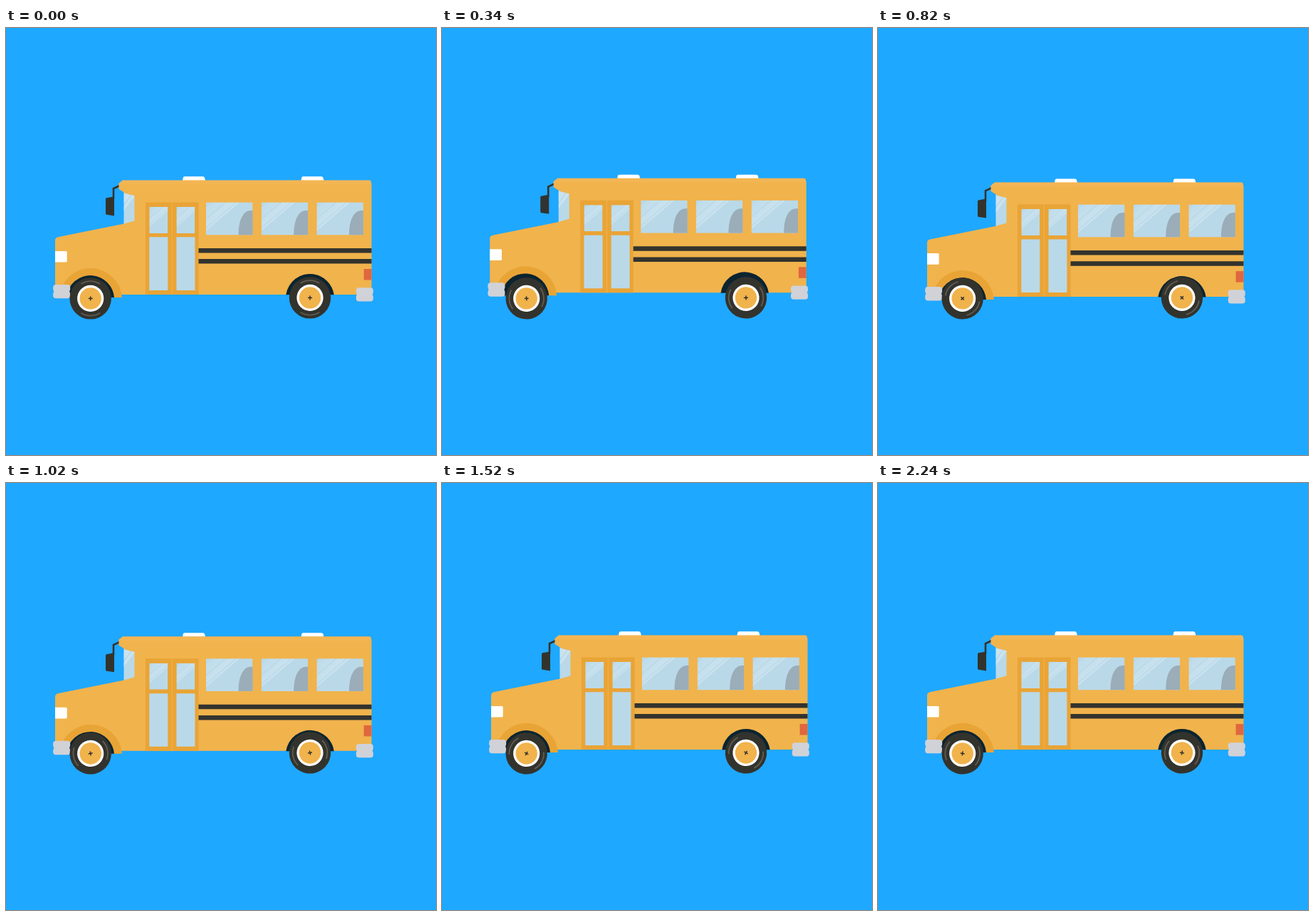
Animation of 604x599 px, one loop 2.26 s. Source, as an HTML page with a canvas:

```html
<!DOCTYPE html>
<html lang="en">
<head>
<meta charset="utf-8">
<title>School bus</title>
<style>
html, body { margin: 0; width: 100%; height: 100%; overflow: hidden; background: #1fa8ff; }
canvas { display: block; }
</style>
</head>
<body>
<canvas id="stage" width="604" height="599"></canvas>
<script>
const ctx = document.getElementById('stage').getContext('2d');
const LOOP = 2260, STEP = 20, SPIN = 1300, BOUNCE = 180;
const C = {
  sky: '#1fa8ff', body: '#f1b34c', roof: '#f4b553', trim: '#e9a436', glass: '#b9d9e9',
  seat: '#9aadb9', dark: '#33332e', arch: '#0b2430', chrome: '#d0d2d8', lamp: '#e0673f',
  tread: '#615c52', white: '#ffffff'
};

// Body offsets [x, y], one every BOUNCE ms.
const bounce = [[0, 0], [0, 8], [-2, -4], [0, 4], [0, 0], [0, 5.6], [0, 0]];

function bodyOffset(t) {
  const k = Math.floor(t / BOUNCE), f = t / BOUNCE - k;
  if (k >= bounce.length - 1) return [0, 0];
  return bounce[k].map((v, i) => v + (bounce[k + 1][i] - v) * f);
}

function box(color, x, y, w, h, r = 0) {
  ctx.fillStyle = color;
  ctx.beginPath();
  ctx.roundRect(x, y, w, h, r);
  ctx.fill();
}

function shape(color, d) {
  ctx.fillStyle = color;
  ctx.fill(new Path2D(d));
}

function disc(color, x, y, r) {
  ctx.fillStyle = color;
  ctx.beginPath();
  ctx.arc(x, y, r, 0, Math.PI * 2);
  ctx.fill();
}

// Circle cap above a horizontal line.
function dome(color, x, y, r, bottom) {
  const a = Math.asin((bottom - y) / r);
  ctx.fillStyle = color;
  ctx.beginPath();
  ctx.arc(x, y, r, Math.PI - a, Math.PI * 2 + a);
  ctx.fill();
}

function clipped(x, y, w, h, draw) {
  ctx.save();
  ctx.beginPath();
  ctx.rect(x, y, w, h);
  ctx.clip();
  ctx.translate(x, y);
  draw();
  ctx.restore();
}

// Diagonal reflections in the top left corner of a pane.
function shine(size) {
  const g = ctx.createLinearGradient(0, 0, size * 0.6, size * 0.6);
  g.addColorStop(0, 'rgba(255,255,255,.05)');
  g.addColorStop(1, 'rgba(255,255,255,.28)');
  for (const [from, to] of [[0.2, 0.62], [0.68, 0.98], [1.03, 1.12]]) {
    const a = from * size, b = to * size;
    shape(g, `M${a} 0H${b}L0 ${b * 0.85}V${a * 0.85}Z`);
  }
}

function sideWindow(x) {
  clipped(x, 244.5, 65.5, 46, () => {
    box(C.glass, 0, 0, 65.5, 46);
    shine(42);
    shape(C.seat, 'M45.5 46C45.5 27 51 11.5 63 11.5H66V46Z');
  });
}

function doorLeaf(x) {
  clipped(x, 251, 26, 37, () => {
    box(C.glass, 0, 0, 26, 37);
    shine(29);
  });
  box(C.glass, x, 293.3, 26, 74.7);
}

function bumper(x, y) {
  box(C.chrome, x, y, 24, 10, 4);
  box(C.chrome, x, y + 9.3, 24, 10, 4);
  box(C.chrome, x + 1, y + 6, 22, 7);
}

function drawBody() {
  for (const x of [248, 414.5]) {
    shape(C.white, `M${x} 214L${x + .7} 210Q${x + 1} 208.3 ${x + 3} 208.3H${x + 28.5}Q${x + 30.5} 208.3 ${x + 31} 210L${x + 32} 214Z`);
  }

  shape(C.glass, 'M165.5 228L182 234V272L165.5 276Z');
  shape('rgba(255,255,255,.28)', 'M165.5 232L175 234L165.5 247ZM177 234H180.5V236L165.5 256V250Z');

  ctx.strokeStyle = C.dark;
  ctx.lineWidth = 2.6;
  ctx.stroke(new Path2D('M151 240V225.2L159.5 221.3'));
  shape(C.dark, 'M140 240Q140 238.6 141.3 238.3L152 236.5V263.5L141 261.8Q140 261.6 140 260.5Z');

  shape(C.body, 'M158.5 218H513.5V374H69V298Q69 294.2 73 293.3L165 274.8L180.5 270.5V235.2L168 232L158.5 226Z');
  shape(C.roof, 'M158.5 219.5V218L164 213.5H510Q513 213.5 513 217V219.5Z');

  box(C.trim, 196, 244.5, 74.5, 129.5);
  box(C.body, 232.8, 244.5, 1, 129.5);
  doorLeaf(201.3);
  doorLeaf(239.4);

  [281, 358.7, 436.4].forEach(sideWindow);
  box(C.dark, 270.5, 309, 243, 6.5);
  box(C.dark, 270.5, 324.1, 243, 6.5);
  box(C.lamp, 502.6, 338, 10.9, 15.5);
  box(C.white, 69, 313, 16.7, 15.6, [0, 1.5, 1.5, 0]);

  dome(C.trim, 119, 381, 44, 378);
  dome(C.arch, 118.5, 380.7, 33.6, 378);
  dome(C.arch, 427, 379, 34, 374.3);
  bumper(66.2, 360);
  bumper(491.8, 364.2);
}

function dome(color, x, y, r, bottom) {
  const a = Math.asin((y - bottom) / r);
  ctx.fillStyle = color;
  ctx.beginPath();
  ctx.arc(x, y, r, Math.PI + a, Math.PI * 2 - a);
  ctx.fill();
}

function drawWheel(x, y, angle) {
  ctx.save();
  ctx.translate(x, y);
  ctx.rotate(angle);
  disc(C.dark, 0, 0, 29.2);
  ctx.strokeStyle = C.tread;
  ctx.lineWidth = 1.8;
  for (const mid of [-Math.PI / 2, Math.PI / 2]) {
    ctx.beginPath();
    ctx.arc(0, 0, 24.3, mid - 0.58, mid + 0.58);
    ctx.stroke();
  }
  disc(C.white, 0, 0, 18.6);
  disc(C.body, 0, 0, 15.2);
  box(C.dark, -3, -0.75, 6, 1.5);
  box(C.dark, -0.75, -3, 1.5, 6);
  ctx.restore();
}

function render(now) {
  const t = Math.floor((now % LOOP) / STEP) * STEP;
  box(C.sky, 0, 0, 604, 599);
  ctx.save();
  ctx.translate(...bodyOffset(t));
  drawBody();
  ctx.restore();
  const angle = -t / SPIN * Math.PI * 2;
  drawWheel(118.7, 379.4, angle);
  drawWheel(427, 378.4, angle);
}

let start;
function tick(now) {
  start ??= now;
  render(now - start);
  requestAnimationFrame(tick);
}
render(0);
requestAnimationFrame(tick);
</script>
</body>
</html>
```
